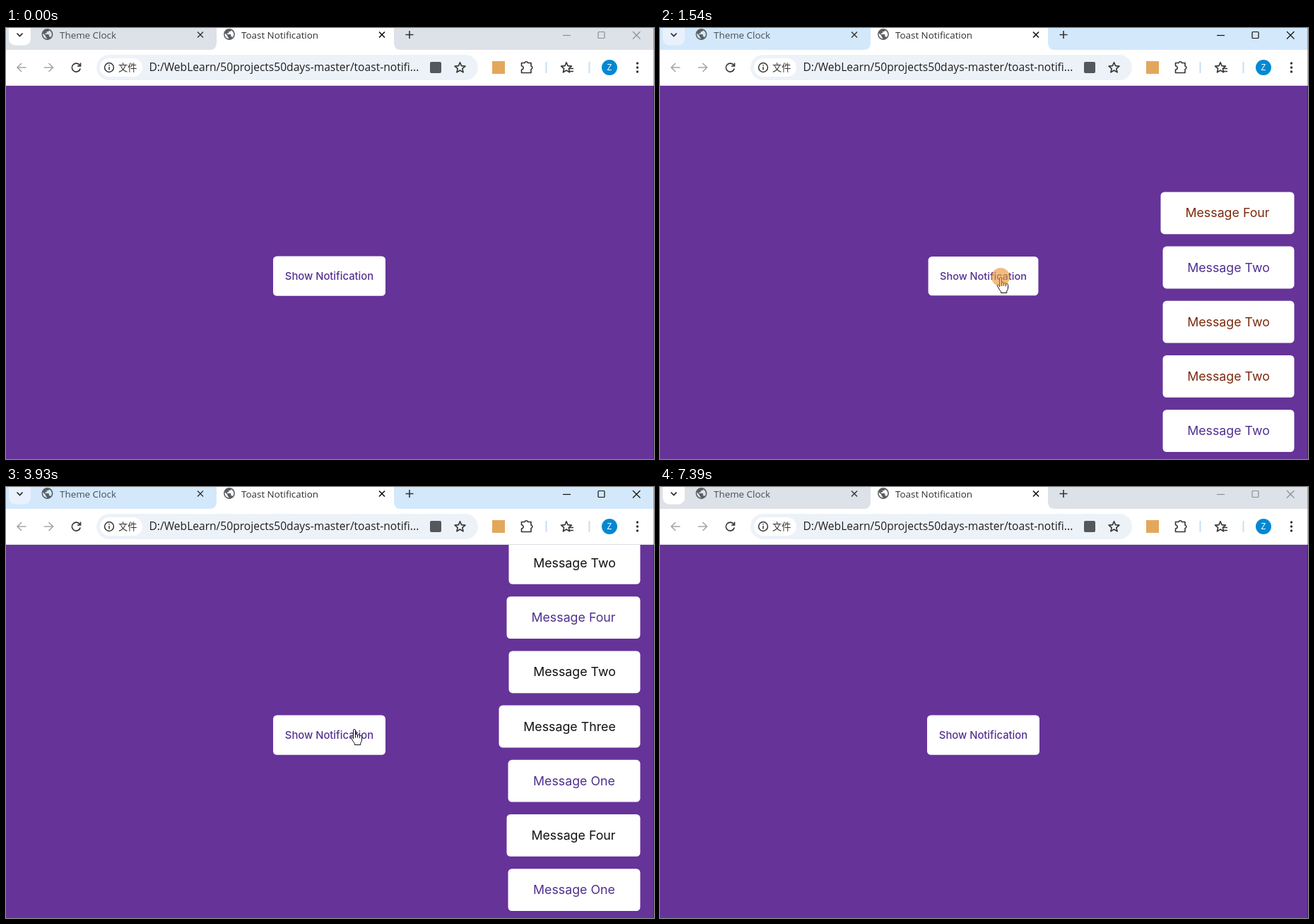
An HTML page for the animation above (7430 ms loop, 917 by 611 pixels).

```html
<!DOCTYPE html>
<html lang="en">
<head>
<meta charset="utf-8">
<title>Toast Notification</title>
<style>
  html, body { margin: 0; width: 100%; height: 100%; overflow: hidden; background: #639; }
  svg { display: block; width: 917px; height: 611px; }
  .ui { font-family: "Open Sans", "Noto Sans", sans-serif; }
  .cjk { font-family: "Noto Sans CJK SC", "Noto Sans CJK", sans-serif; }
  .page { font-family: Inter, sans-serif; text-anchor: middle; }
  .line { fill: none; stroke: #333; stroke-width: 1.6; }
</style>
</head>
<body>
<svg viewBox="0 0 917 611" xmlns="http://www.w3.org/2000/svg">
  <defs>
    <clipPath id="view"><rect y="82" width="917" height="529"/></clipPath>
    <path id="globe" transform="scale(.79) translate(-12 -12)" fill="#5b5f64" d="M12 2C6.48 2 2 6.48 2 12s4.48 10 10 10 10-4.48 10-10S17.52 2 12 2zm-1 17.93c-3.95-.49-7-3.85-7-7.93 0-.62.08-1.21.21-1.79L9 15v1c0 1.1.9 2 2 2v1.93zm6.9-2.54c-.26-.81-1-1.39-1.9-1.39h-1v-3c0-.55-.45-1-1-1H8v-2h2c.55 0 1-.45 1-1V7h2c1.1 0 2-.9 2-2v-.41c2.93 1.19 5 4.06 5 7.41 0 2.08-.8 3.97-2.1 5.39z"/>
    <path id="cross" d="M-4 -4L4 4M4 -4L-4 4"/>
  </defs>

  <rect width="917" height="611" fill="#639"/>

  <g class="page">
    <g id="button">
      <rect x="378" y="323.4" width="159" height="56.4" rx="5.4" fill="#fff"/>
      <text x="457.5" y="356.8" font-size="14.8" font-weight="500" fill="#553092">Show Notification</text>
    </g>
    <g id="toasts" clip-path="url(#view)"></g>
  </g>

  <g id="chrome" class="ui">
    <rect id="strip" width="917" height="32"/>
    <rect id="menu" x="4" y="-10" width="31" height="34.5" rx="9"/>
    <path d="M15.5 7.5L19.5 11.5L23.5 7.5" class="line" style="stroke:#222"/>
    <path d="M288 31Q298 31 298 21V0H549V21Q549 31 559 31V32H288Z" fill="#fff"/>
    <use href="#globe" x="58.5" y="9"/>
    <use href="#globe" x="316" y="9"/>
    <g font-size="13.4">
      <text x="76" y="15" fill="#4a4d52">Theme Clock</text>
      <text x="333" y="15" fill="#2c2e31">Toast Notification</text>
    </g>
    <use href="#cross" x="275" y="9.5" class="line" style="stroke-width:1.4"/>
    <use href="#cross" x="532" y="9.5" class="line" style="stroke:#111"/>
    <path d="M565.5 9.5H576.5M571 4V15" class="line"/>
    <g id="controls" fill="none" stroke-width="1.2">
      <path d="M788 10.5H799"/>
      <rect x="838" y="5.5" width="9" height="9" rx="1"/>
      <path d="M887 5L897.5 15.5M897.5 5L887 15.5"/>
    </g>

    <rect y="31" width="917" height="50" fill="#fff"/>
    <rect y="81" width="917" height="1" fill="#dcdfe6"/>
    <g class="line" style="stroke:#a6a6a6">
      <path d="M28.5 56H16M22 50L16 56L22 62"/>
      <path d="M54 56H66.500M60.500 50L66.500 56L60.500 62"/>
    </g>
    <path d="M104.500 53A6 6 0 1 0 105.200 57.500M105.500 49.500V54H101" class="line"/>

    <rect x="128" y="38" width="540" height="36" rx="18" fill="#edf2f9"/>
    <rect x="133" y="43" width="60" height="26" rx="13" fill="#fff"/>
    <circle cx="146" cy="56" r="6.400" class="line" style="stroke-width:1.500"/>
    <path d="M146 55V59.500M146 52V53.600" class="line" style="stroke-width:1.500"/>
    <text x="159" y="61" font-size="13.200" fill="#333" class="cjk">文件</text>
    <text x="202.500" y="61.300" font-size="15.600" fill="#1f1f1f">D:/WebLearn/50projects50days-master/toast-notifi...</text>
    <rect x="600" y="48" width="16" height="16" rx="2" fill="#54575b"/>
    <path id="star" class="line" stroke-linejoin="round"/>
    <rect x="688" y="47" width="18" height="18" fill="#e3a75c"/>
    <path class="line" stroke-linejoin="round" d="M729.500 49.500H734A2.300 2.300 0 0 1 738.500 49.500H743V54A2.300 2.300 0 0 1 743 58.500V63.500H729.500V59A2.600 2.600 0 0 0 729.500 53.700Z"/>
    <path d="M764.500 48V64M825.500 48V64" stroke="#c9def6" stroke-width="2"/>
    <path id="star2" class="line" stroke-linejoin="round"/>
    <path d="M797 57.500H803M798 61.500H803" class="line"/>
    <circle cx="854" cy="56" r="11" fill="#0288d1"/>
    <text x="854" y="60.300" font-size="12" fill="#fff" text-anchor="middle">Z</text>
    <g fill="#333"><circle cx="893.500" cy="50" r="1.700"/><circle cx="893.500" cy="56" r="1.700"/><circle cx="893.500" cy="62" r="1.700"/></g>
  </g>
  <rect x="916" width="1" height="611" fill="#000" opacity=".3"/>

  <g id="cursor">
    <g fill="#fff" stroke="#111" stroke-width="1" stroke-linejoin="round">
      <path id="arrow" d="M0 0V17L4 13.300L6.700 19.500L9.200 18.400L6.600 12.400H12Z"/>
      <path id="hand" d="M-1.500 14V2A1.500 1.500 0 0 1 1.500 2V8.500Q1.700 7 3.100 7.200Q4.500 7.400 4.500 9Q4.900 7.800 6.100 8Q7.500 8.300 7.500 10Q8 9 9.100 9.300Q10.500 9.800 10.500 11.500V15Q10.500 18 8.700 20V22.500H.500V20.500Q-1.500 18.500 -2.800 15.800L-4.700 12.600Q-5 11 -3.700 10.900Q-2.500 11 -1.500 13M1.500 8.500V12.500M4.500 9V12.500M7.500 10V13"/>
    </g>
    <circle id="press" r="13" fill="#e69a3a" opacity=".65"/>
  </g>
</svg>

<script>
const LOOP = 7430, LIFE = 3070, SLOT = 77.2;
const $ = id => document.getElementById(id);
const NS = "http://www.w3.org/2000/svg";

const WIDTH = { One: 187, Two: 186, Three: 200, Four: 189 };
const PURPLE = "#50308f", BROWN = "#7c2a0c", BLACK = "#111";

// [press, release, message, colour]; the toast appears on release
const clicks = [
  [620, 690, "Four", BROWN], [800, 870, "Two", PURPLE],
  [970, 1040, "Two", BROWN], [1170, 1240, "Two", BROWN],
  [1360, 1420, "Two", PURPLE], [1540, 1610, "Two", BLACK],
  [1740, 1810, "Four", PURPLE], [1950, 2020, "Two", BLACK],
  [2150, 2220, "Three", BLACK], [2360, 2430, "One", PURPLE],
  [2500, 2640, "Four", BLACK], [2740, 2810, "One", PURPLE]
];

// [time, x, y] of the pointer tip
const path = [
  [50, 830, 616], [560, 482, 353], [3160, 482, 353], [3260, 489, 353],
  [3929, 489, 353], [3930, 493, 343], [4080, 570, 354], [4240, 570, 354],
  [4360, 583, 354], [4570, 583, 354], [5030, 518, 346], [5740, 518, 346],
  [5840, 504, 344], [6010, 495, 346], [6330, 495, 346], [6650, 828, 618]
];

function make(tag, attrs, parent) {
  const el = document.createElementNS(NS, tag);
  for (const k in attrs) el.setAttribute(k, attrs[k]);
  return parent.appendChild(el);
}

function starPath(cx, cy, r) {
  let d = "";
  for (let i = 0; i < 10; i++) {
    const a = Math.PI * (i / 5 - 0.5), q = i % 2 ? r * 0.45 : r;
    d += (i ? "L" : "M") + (cx + q * Math.cos(a)).toFixed(2) + " " + (cy + q * Math.sin(a)).toFixed(2);
  }
  return d + "Z";
}
$("star").setAttribute("d", starPath(642.5, 56.5, 7.8));
$("star2").setAttribute("d", starPath(793, 56.5, 7.8));

const toasts = clicks.map(([, born, word, color]) => {
  const w = WIDTH[word], g = make("g", {}, $("toasts"));
  make("rect", { x: 897.5 - w, y: 541.2, width: w, height: 59.8, rx: 5.4, fill: "#fff" }, g);
  const label = make("text", { x: 897.5 - w / 2, y: 577.3, "font-size": 17.8, fill: color }, g);
  label.textContent = "Message " + word;
  return { g, born };
});

function pointerAt(t) {
  const i = path.findIndex(k => k[0] > t);
  if (i < 1) return null;
  const [t0, x0, y0] = path[i - 1], [t1, x1, y1] = path[i];
  const u = (t - t0) / (t1 - t0), e = u * u * (3 - 2 * u);
  return [x0 + (x1 - x0) * e, y0 + (y1 - y0) * e];
}

const show = (el, on) => el.setAttribute("visibility", on ? "visible" : "hidden");

function render(t) {
  const active = t >= clicks[0][0] && t < 7390;
  $("strip").setAttribute("fill", active ? "#d3e8fb" : "#dde1e8");
  $("menu").setAttribute("fill", active ? "#e9f2fc" : "#fff");
  $("controls").setAttribute("stroke", active ? "#111" : "#8c9094");

  const pressed = clicks.some(([a, b]) => t >= a && t < b);
  $("button").setAttribute("transform",
    pressed ? "translate(457.5 351.6) scale(.98) translate(-457.5 -351.6)" : "");

  const count = toasts.filter(o => t >= o.born).length;
  toasts.forEach((o, i) => {
    show(o.g, t >= o.born && t < o.born + LIFE);
    o.g.setAttribute("transform", `translate(0 ${(i + 1 - count) * SLOT})`);
  });

  const p = pointerAt(t);
  $("cursor").setAttribute("display", p ? "inline" : "none");
  if (p) {
    const [x, y] = p, over = x > 378 && x < 537 && y > 323 && y < 380;
    $("cursor").setAttribute("transform", `translate(${x} ${y})`);
    show($("hand"), over);
    show($("arrow"), !over);
    show($("press"), pressed);
  }
}

const start = performance.now();
function tick() {
  render((performance.now() - start) % LOOP);
  requestAnimationFrame(tick);
}
tick();
</script>
</body>
</html>
```
